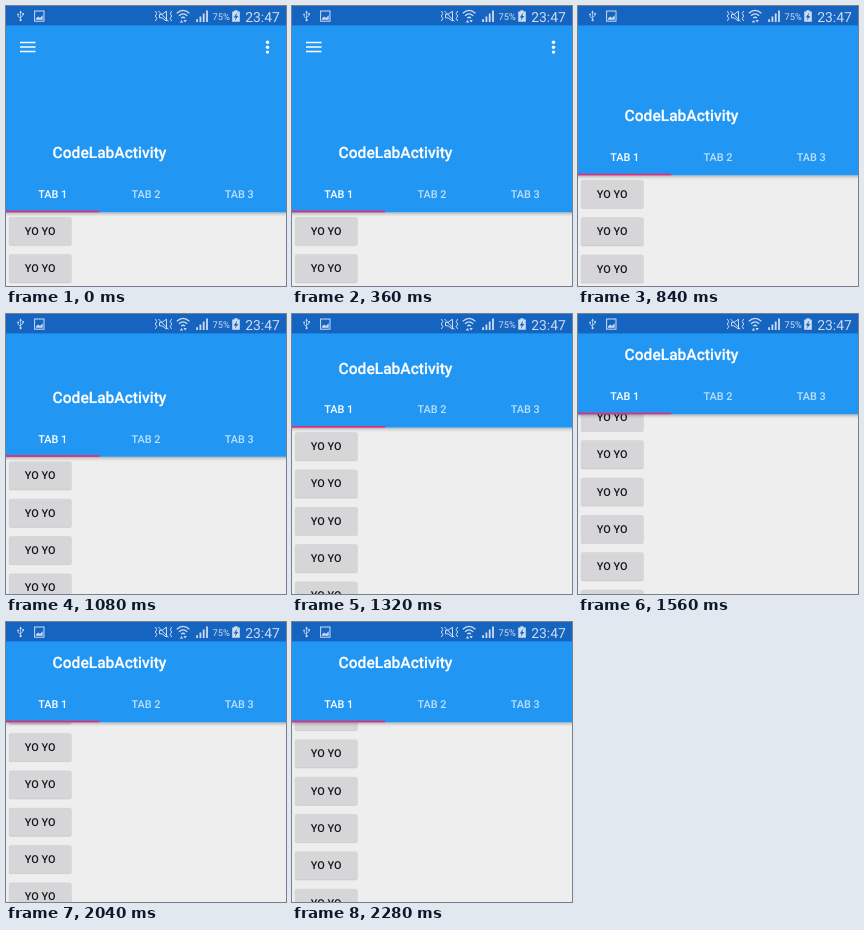
Write an HTML page that moves like this. It is 280 by 280 pixels and loops after 2.4 s.

```html
<!DOCTYPE html>
<html lang="en">
<head>
<meta charset="utf-8">
<title>Collapsing toolbar</title>
<style>
  html, body { margin: 0; width: 100%; height: 100%; overflow: hidden; background: #eee; }
  svg { display: block; width: 100%; height: 100%; }
  text { font-family: Roboto, "Noto Sans", sans-serif; text-rendering: geometricPrecision; }
  .label { font-size: 10.9px; font-weight: 500; text-anchor: middle; }
  .title { font-size: 15.55px; font-weight: 500; fill: #fff; stroke: #fff; stroke-width: .2; }
  .line { fill: none; stroke: #ccdcf1; stroke-width: 1; }
</style>
</head>
<body>
<svg viewBox="0 0 280 280">
  <defs>
    <linearGradient id="shade" x1="0" y1="0" x2="0" y2="1">
      <stop offset="0" stop-color="#000" stop-opacity=".25"/>
      <stop offset=".45" stop-color="#000" stop-opacity=".09"/>
      <stop offset="1" stop-color="#000" stop-opacity="0"/>
    </linearGradient>
    <g id="button">
      <rect x="2.6" y="-13.8" width="63.2" height="29" rx="2.2" fill="#000" opacity=".06"/>
      <rect x="3" y="-13.4" width="62.4" height="28" rx="1.8" fill="#000" opacity=".1"/>
      <rect x="3.1" y="-14" width="62.2" height="28" rx="1.6" fill="#d6d6d8"/>
      <text class="label" x="34.2" y="3.9" fill="#161616">YO YO</text>
    </g>
  </defs>

  <rect width="280" height="280" fill="#eee"/>
  <g id="list"></g>

  <g id="header">
    <rect y="206.3" width="280" height="4.5" fill="url(#shade)"/>
    <rect width="280" height="206.3" fill="#2196f3"/>
    <path d="M14 36.5h15.5M14 41h15.5M14 45.5h15.5" stroke="#fff" stroke-width="1.6"/>
    <g fill="#fff">
      <circle cx="261.5" cy="36.3" r="1.7"/>
      <circle cx="261.5" cy="41.2" r="1.7"/>
      <circle cx="261.5" cy="46.1" r="1.7"/>
    </g>
    <text class="title" x="46.6" y="152.3">CodeLabActivity</text>
    <g id="tabs" fill="#fff"></g>
    <rect y="204.7" width="93.3" height="1.6" fill="#f0266f"/>
  </g>

  <rect width="280" height="19.4" fill="#1565c0"/>
  <g fill="#ccdcf1">
    <!-- usb -->
    <path class="line" style="stroke-width:.8" d="M14.6 6v8M14.6 12.5l-2.5-2V8.5M14.6 11.2l2.5-1.8V7.5"/>
    <path d="M13.2 6.8l1.4-2.2 1.4 2.2z"/>
    <circle cx="14.6" cy="14.2" r="1.1"/>
    <circle cx="12.1" cy="8.3" r=".9"/>
    <rect x="16.3" y="7" width="1.6" height="1.6"/>
    <!-- picture -->
    <rect class="line" x="28.6" y="5" width="9.4" height="10.2"/>
    <path d="M30 13.8v-1.4l2.2-2 1.8 1.6 2.7-2.8v4.6z"/>
    <!-- muted, vibrating -->
    <path class="line" d="M153.5 8.4h2.4l4.6-3.2v9.8l-4.6-3.2h-2.4zM152.5 5l10 10.4"/>
    <path class="line" d="M149.3 5l1.5 2.5-1.5 2.5 1.5 2.5-1.5 2.5M165.7 5l-1.5 2.5 1.5 2.5-1.5 2.5 1.5 2.5"/>
    <!-- wifi -->
    <path class="line" style="stroke-width:1.2" d="M170.8 7.3q6.3-6 12.6 0M173 9.8q4.1-3.8 8.2 0M175.2 12.1q1.9-1.7 3.8 0"/>
    <path d="M173.8 16.6l1.7-2.6 1.7 2.6zM177.4 14h3.4l-1.7 2.6z"/>
    <!-- signal -->
    <path d="M190.2 13.2h1.8v2.8h-1.8zM193.5 10.6h1.8V16h-1.8zM196.8 7.6h1.8V16h-1.8zM200.1 4.4h1.8V16h-1.8z"/>
    <text x="206.6" y="13.9" font-size="9.3">75%</text>
    <!-- battery -->
    <path d="M228.4 4.2h3.2v1.4h2.2v10.2h-7.6V5.6h2.2z"/>
    <path d="M231.3 6.6l-3.6 4.8h2l-.9 3.4 3.5-4.8h-2z" fill="#1565c0"/>
    <text x="239.2" y="15.7" font-size="13.9">23:47</text>
  </g>
</svg>

<script>
  const LOOP = 2400, STEP = 120;
  const COLLAPSE = 106, FIRST_ROW = 225, ROW = 37.33;
  // [time in ms, distance the finger has scrolled]
  const DRAG = [[0, 0], [480, 0], [600, 2.3], [840, 37], [1080, 63.5], [1560, 122], [2040, 174.5], [2280, 205.5]];

  const list = document.getElementById('list');
  const header = document.getElementById('header');

  list.innerHTML = Array.from({ length: 14 }, (_, i) =>
    `<use href="#button" y="${FIRST_ROW + i * ROW}"/>`).join('');
  document.getElementById('tabs').innerHTML = [1, 2, 3].map(n =>
    `<text class="label" x="${(n - 0.5) * 280 / 3}" y="192" opacity="${n === 1 ? 1 : 0.7}">TAB ${n}</text>`).join('');

  function scrolled(t) {
    const next = DRAG.findIndex(([time]) => time > t);
    if (next < 0) return DRAG[DRAG.length - 1][1];
    const [t0, y0] = DRAG[next - 1], [t1, y1] = DRAG[next];
    return y0 + (y1 - y0) * (t - t0) / (t1 - t0);
  }

  function render(now) {
    const y = scrolled(Math.floor(now % LOOP / STEP) * STEP);
    list.setAttribute('transform', `translate(0 ${-y})`);
    header.setAttribute('transform', `translate(0 ${-Math.min(y, COLLAPSE)})`);
  }

  let start;
  function tick(now) {
    start ??= now;
    render(now - start);
    requestAnimationFrame(tick);
  }
  render(0);
  requestAnimationFrame(tick);
</script>
</body>
</html>
```
